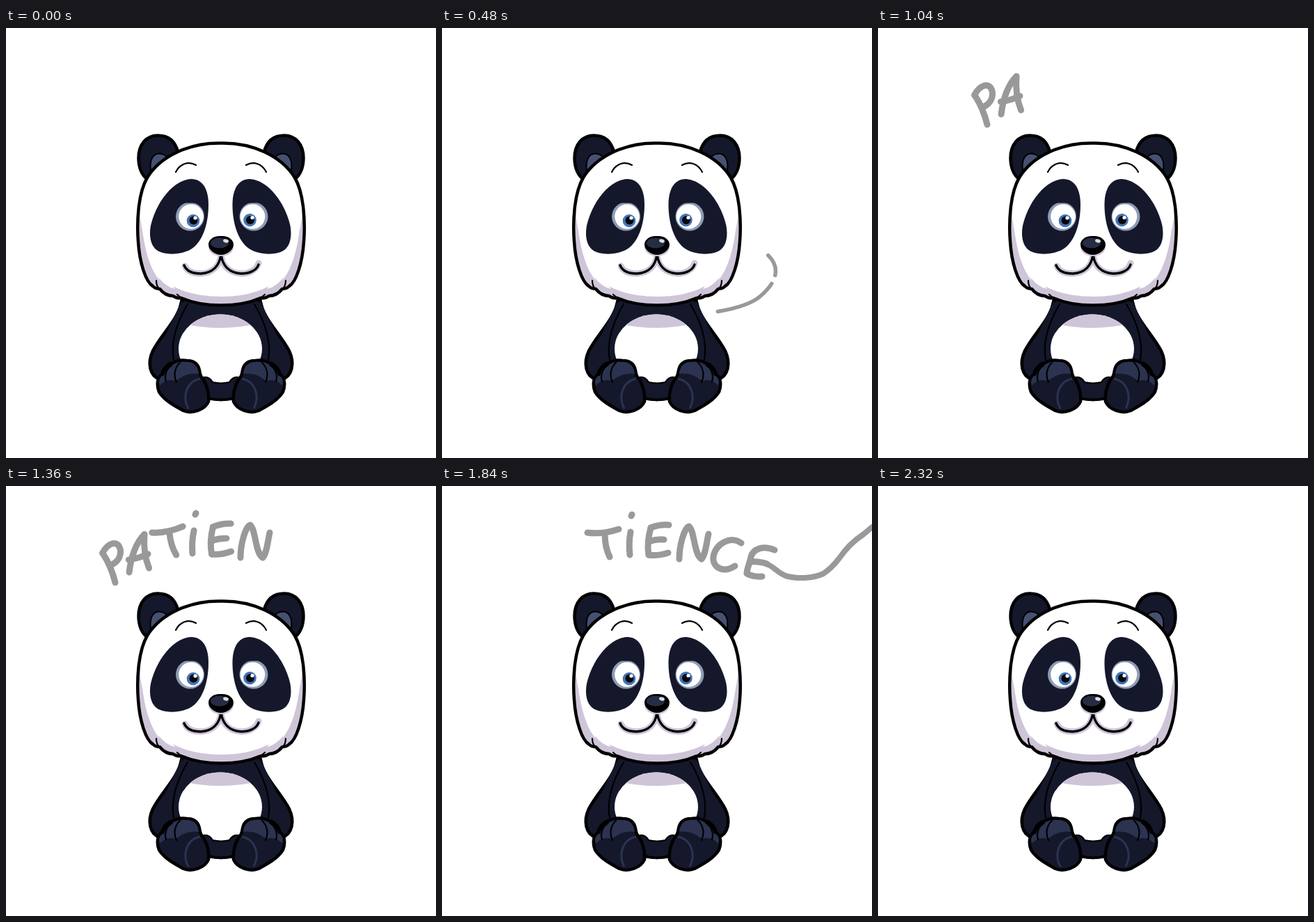
These frames come from a looping animation (618 px wide and 618 px high, 2960 ms). An HTML page:

```html
<!DOCTYPE html>
<html lang="en">
<head>
<meta charset="utf-8">
<title>Patience</title>
<style>
  html, body { margin: 0; width: 100%; height: 100%; overflow: hidden; background: #fff; }
  svg { display: block; width: 100vw; height: 100vh; }
  .navy { fill: #15182b; }
  .lilac { fill: #cfc5d8; }
  .ink { stroke: #000; stroke-width: 4.5; stroke-linejoin: round; stroke-linecap: round; }
  .line { fill: none; stroke: #000; stroke-width: 2.2; stroke-linecap: round; stroke-linejoin: round; }
  .bold { stroke-width: 3.4; }
  .brush { fill: none; stroke: #999; stroke-linecap: round; stroke-linejoin: round; }
</style>
</head>
<body>
<svg viewBox="0 0 618 618" role="img" aria-label="A panda, and the word patience">
  <defs>
    <clipPath id="bellyClip"><ellipse cx="308" cy="461" rx="60" ry="49.5"/></clipPath>
    <clipPath id="eyeL"><circle cx="265" cy="271" r="21.5"/></clipPath>
    <clipPath id="eyeR"><circle cx="355.5" cy="271" r="21.5"/></clipPath>

    <g id="ear">
      <path class="navy ink" d="M247 178C243 162 233 154.500 218 154.500C202 154.500 190.500 167 190.500 187C190.500 200 195 212 204 218L230 205Z"/>
      <path d="M208 205C206 190 211 180.500 220 180.500C228 180.500 233 186 235 192L214 213Z" fill="#465070" stroke="#000" stroke-width="2"/>
    </g>

    <g id="arm">
      <path class="navy ink" d="M253 392C247 420 224 439 211 464C203 481 206 501 222 505C237 506 247 494 249 476"/>
      <path class="navy" d="M253 392L262 410L249 478L215 470Z"/>
      <path class="line" d="M261 397C247 420 236 450 241 477"/>
    </g>

    <g id="foot">
      <path class="navy ink" d="M241 481C233 482 226 489 224 498C216 503 217 516 220 523C228 536 244 544 255 550C267 555 286 549 291 537C292 526 289 514 283 504C279 501 279 497 278 492C276 482 270 478 260 478C253 477 246 478 241 481Z"/>
      <path fill="#2b3350" d="M241 483C234 484 228 490 226 499C220 503 219 508 221 514C228 506 236 505 244 507C251 503 258 495 277 497C276 486 270 480 260 480C253 479 246 480 241 483Z"/>
      <path fill="none" stroke="#2b3350" stroke-width="3" d="M262 547C253 530 259 508 279 504"/>
      <path class="line" d="M226 499C228 491 233 486 239 484M230 508C227 499 231 489 238 485M245 509C240 499 243 487 250 481"/>
    </g>

    <path id="patch" class="navy" d="M266 217C283 217 291 232 291 254C291 277 285 302 270 315C258 325 236 327 222 322C208 317 205 300 208 284C214 256 237 219 266 217Z"/>
  </defs>

  <rect width="618" height="618" fill="#fff"/>
  <path id="orbit" class="brush" stroke-width="5.500"/>

  <!-- body -->
  <path class="navy ink" d="M253 390C244 425 238 455 241 485C247 515 275 534 309 534C343 534 371 515 377 485C380 455 374 425 365 390Z"/>
  <use href="#arm"/>
  <use href="#arm" transform="matrix(-1 0 0 1 618 0)"/>
  <ellipse cx="308" cy="461" rx="60" ry="49.500" fill="#fff"/>
  <path class="lilac" clip-path="url(#bellyClip)" d="M240 405H376V421Q308 441 240 421Z"/>
  <path class="navy" d="M276 504Q290 497 297 509Q309 512 321 509Q328 497 342 504L334 526C320 535 298 535 284 526Z"/>
  <path class="line" d="M281 503Q291 499 297 509Q309 512 321 509Q327 499 337 503"/>
  <path class="line bold" d="M288 531Q309 538 330 531"/>
  <use href="#foot"/>
  <use href="#foot" transform="matrix(-1 0 0 1 618 0)"/>

  <!-- head -->
  <use href="#ear"/>
  <use href="#ear" transform="matrix(-1 0 0 1 618 0)"/>
  <path class="lilac" id="skull" d="M309 165.500C264 164.500 222 184 203 215C189 239 188 282 190 307C192 338 201 365 211 371Q215 375 221 375Q229 385 240 385Q245 389 252 388C270 396 290 398.500 309 398.500C328 398.500 348 396 366 388Q373 389 378 385Q389 385 397 375Q403 375 407 371C417 365 426 338 428 307C430 282 429 239 415 215C396 184 354 164.500 309 165.500Z"/>
  <path fill="#fff" d="M309 165C264 164 222 184 203 215C190 239 191 270 196 291C200 321 208 348 221 363L219 358Q229 372 243 375L240 371C260 382 285 386 309 386C333 386 358 382 378 371L375 375Q389 372 399 358L397 363C410 348 418 321 422 291C427 270 428 239 415 215C396 184 354 164 309 165Z"/>
  <use href="#skull" class="ink" style="fill-opacity:0"/>
  <path class="line" d="M216 363Q216 371 221 376M402 363Q402 371 397 376M246 383L252 388M372 383L366 388"/>

  <!-- face -->
  <path class="line" d="M244 207C250 195 262 191 273 197M345 197C356 191 368 195 374 207"/>
  <use href="#patch"/>
  <use href="#patch" transform="matrix(-1 0 0 1 616.500 0)"/>
  <g id="eyes">
    <circle cx="264.500" cy="271" r="20.500" fill="#8e9bb4"/>
    <circle cx="266" cy="271" r="17.800" fill="#fff"/>
    <circle cx="269" cy="277" r="9.300" fill="#4574b5"/>
    <circle cx="269.500" cy="276.500" r="6" fill="#05070d"/>
    <circle cx="272" cy="273" r="2.600" fill="#fff"/>
    <circle cx="356" cy="271" r="20.500" fill="#8e9bb4"/>
    <circle cx="354.500" cy="271" r="17.800" fill="#fff"/>
    <circle cx="350.500" cy="276" r="9.300" fill="#4574b5"/>
    <circle cx="351" cy="276" r="6" fill="#05070d"/>
    <circle cx="354" cy="272.500" r="2.600" fill="#fff"/>
  </g>
  <g class="navy">
    <g clip-path="url(#eyeL)"><path class="lid" d="M240 205H290V249Q265 255 240 247Z"/></g>
    <g clip-path="url(#eyeR)"><path class="lid" d="M331 205H381V247Q356 255 331 249Z"/></g>
  </g>
  <path fill="none" stroke="#cfc5d8" stroke-width="9" stroke-linecap="round" stroke-linejoin="round" d="M257 342C261 351 270 353 280 353C297 352 307 342 309 327C311 342 321 352 338 353C349 353 360 348 363 338"/>
  <path class="line bold" d="M256 341C260 351 270 353 280 353C297 352 307 342 309 325C311 342 321 352 338 353C349 353 360 349 363 340"/>
  <ellipse class="lilac" cx="309" cy="315" rx="18" ry="13"/>
  <path d="M309 299C319 298 327 304 327 311C327 319 318 326 309 326C300 326 291 319 291 311C291 304 299 298 309 299Z"/>
  <ellipse cx="307" cy="309" rx="13" ry="7.500" fill="#262c43"/>
  <ellipse cx="316" cy="306" rx="4" ry="2.500" fill="#d9dce6" transform="rotate(15 316 306)"/>

  <path id="exit" class="brush" stroke-width="8"/>
  <g id="word" class="brush" stroke-width="9"></g>
</svg>
<script>
const STEP = 80, LOOP = 2960;
const $ = id => document.getElementById(id);

// Ribbon that climbs around the panda, then meets the first letter.
const climb = "M160 443C165 433 179 422 195 423C270 415 420 420 458 385C505 345 470 310 400 300C310 287 240 292 187 288Q160 286 140 279";
const rise = "C106 268 100 220 110 180C117 145 124 118 136 99";
const away = "M466 112C477 115 484 127 497 130C515 134 535 132 548 126Q560 118 570 105Q586 82 605 70L650 32";

// Strokes of each letter, its tilt while being written [dx, dy, turn], and a looser late form.
const letters = [
  { d: "M136 98Q147 116 152 140M135 97C144 82 158 78 161 93C162 105 154 112 146 115", tilt: [4, -1, -2] },
  { d: "M176 126C177 104 183 82 194 70M194 70C194 90 198 106 204 118M174 108Q189 105 201 98", tilt: [3, -1, 4] },
  { d: "M209 67Q230 70 254 62M234 68Q234 88 241 102", tilt: [2, -2, -5] },
  { d: "M271 66Q268 82 270 99M273 41L272 43", tilt: [-1, -2, 2] },
  { d: "M300 60Q294 82 297 99M300 60Q312 55 326 56M297 80Q308 76 319 77M297 99Q310 101 325 96", tilt: [-2, -1, -2],
    late: "M270 72Q300 72 318 60M273 85Q294 86 311 80M282 100Q296 101 311 97M297 70Q290 86 292 99" },
  { d: "M341 105C341 86 348 60 355 58C363 64 362 99 373 105C379 98 380 82 383 69", tilt: [-4, -2, 0],
    late: "M335 106C334 86 348 60 357 58C364 62 362 90 369 102C375 98 380 78 387 64" },
  { d: "M430 82C416 71 394 82 390 101C388 117 404 126 421 115", tilt: [0, 0, 0],
    late: "M425 82C416 60 394 84 393 102C393 118 408 127 417 117" },
  { d: "M478 92C462 85 447 90 444 102C442 112 438 119 438 126Q448 131 460 130M443 109Q457 108 467 112", tilt: [0, 0, 0],
    late: "M471 92C452 88 441 100 441 109C442 123 458 129 474 129M441 108Q462 110 482 100" }
];

const clamp = x => Math.max(0, Math.min(1, x));

// Reads a row of values from a table of [time, ...values].
function ease(table, t) {
  let i = 1;
  while (i < table.length - 1 && t > table[i][0]) i++;
  const a = table[i - 1], b = table[i], k = clamp((t - a[0]) / (b[0] - a[0]));
  return a.slice(1).map((v, n) => v + (b[n + 1] - v) * k);
}

function show(el, from, to) {
  const on = to - from > 0.5;
  el.style.visibility = on ? "visible" : "hidden";
  if (!on) return;
  el.style.strokeDasharray = `${to - from} 9999`;
  el.style.strokeDashoffset = -from;
}

function makeStrokes(d, parent) {
  return d.match(/M[^M]+/g).map(part => {
    const p = document.createElementNS("http://www.w3.org/2000/svg", "path");
    p.setAttribute("d", part);
    parent.append(p);
    return { p, len: p.getTotalLength() };
  });
}

for (const l of letters) {
  const g = document.createElementNS("http://www.w3.org/2000/svg", "g");
  $("word").append(g);
  l.g = g;
  l.first = makeStrokes(l.d, g);
  l.last = l.late ? makeStrokes(l.late, g) : l.first;
  const b = g.getBBox();
  l.mid = `${b.x + b.width / 2} ${b.y + b.height / 2}`;
}

const orbit = $("orbit"), exit = $("exit"), lids = document.querySelectorAll(".lid");
orbit.setAttribute("d", climb);
const half = orbit.getTotalLength();
orbit.setAttribute("d", climb + rise);
const full = orbit.getTotalLength();
exit.setAttribute("d", away);

const ribbon = [[160, 0, 0], [240, 0, 42], [320, 30, 155], [720, half - 150, half],
                [880, full - 130, full], [960, full, full]];
const tail = [[1600, 0], [1680, 37], [1760, 95], [1840, 185], [1920, 240]];
const blink = [[640, 0], [720, 13], [800, 42], [880, 13], [960, 0]];
const written = [960, 1040, 1120, 1200, 1280, 1360, 1480, 1600];

function drawRibbon(t) {
  const [a, b] = ease(ribbon, t), len = b - a;
  show(orbit, a, b);
  if (len > 80) orbit.style.strokeDasharray = `${len - 45} 13 32 9999`;
}

function drawLetter(l, i, t) {
  const end = written[i], span = i < 6 ? 80 : 120;
  const come = clamp((t - end + span) / span);
  const go = clamp((t - 1680 - 80 * i) / 80);
  const live = l.late && t >= 1920 ? l.last : l.first;
  for (const s of [...l.first, ...l.last]) s.p.style.visibility = "hidden";
  const n = live.length;
  live.forEach((s, k) => show(s.p, s.len * clamp(go * n - k), s.len * clamp(come * n - k)));
  const k = 1 - clamp((t - 1360) / 320), [x, y, r] = l.tilt;
  l.g.setAttribute("transform", `translate(${x * k} ${y * k}) rotate(${r * k} ${l.mid})`);
}

function drawExit(t) {
  if (t < 1920) return show(exit, 0, ease(tail, t)[0]);
  exit.style.visibility = t < 2320 ? "visible" : "hidden";
  exit.style.strokeDasharray = "18 36 47 72";
  exit.style.strokeDashoffset = -66 - (t - 2000) * 1.1;
}

function draw(t) {
  drawRibbon(t);
  letters.forEach((l, i) => drawLetter(l, i, t));
  drawExit(t);
  const drop = ease(blink, t)[0];
  lids.forEach(l => l.setAttribute("transform", `translate(0 ${drop})`));
}

const start = performance.now();
function tick() {
  const t = (performance.now() - start) % LOOP;
  draw(Math.min(2320, Math.floor(t / STEP) * STEP));
  requestAnimationFrame(tick);
}
tick();
</script>
</body>
</html>
```
